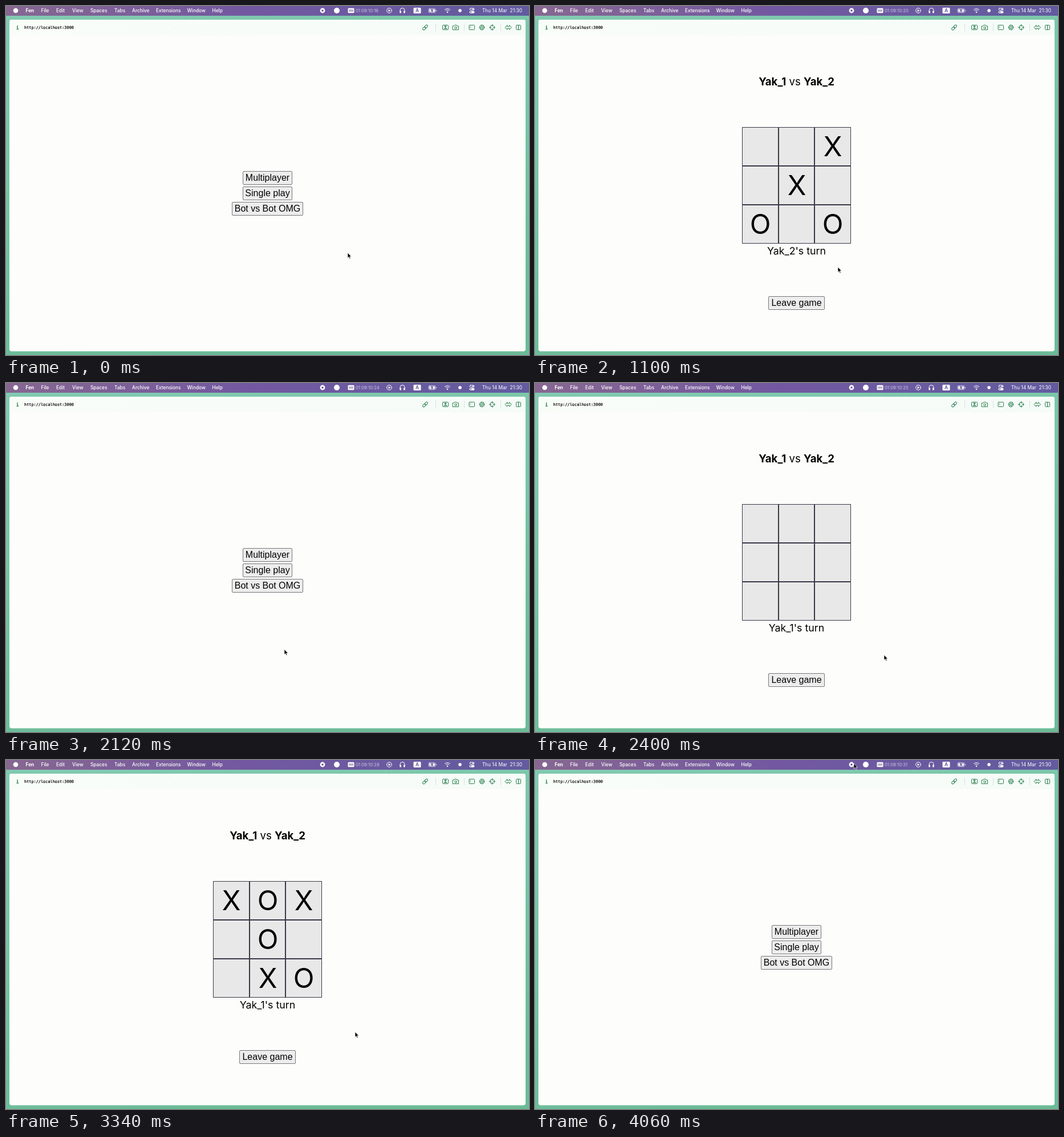
An HTML page for the animation above (4080 ms loop, 917x611 px).

```html
<!DOCTYPE html>
<html lang="en">
<head>
<meta charset="utf-8">
<title>Tic-tac-toe bots</title>
<style>
  html, body { margin: 0; width: 100%; height: 100%; overflow: hidden; background: #74c2a2; }
  svg { display: block; width: 917px; height: 611px; }
  text { font-family: Inter, sans-serif; white-space: pre; }
  .menu text { font-size: 8.3px; fill: #fff; }
  .mid { text-anchor: middle; }
  .btn text { font: 16px "Liberation Sans", Arial, sans-serif; }
  .btn rect { fill: #ededed; stroke: #77777b; }
  .mark { font-size: 48px; }
  .turn { font-size: 17.8px; }
  .url { font: 6.88px "DejaVu Sans Mono", monospace; stroke: #000; stroke-width: .2; }
  .line { fill: none; stroke: #fff; stroke-width: 1; stroke-linecap: round; stroke-linejoin: round; }
  .tools { fill: none; stroke: #2c7f4d; stroke-width: 1; stroke-linecap: round; stroke-linejoin: round; }
</style>
</head>
<body>
<svg viewBox="0 0 917 611">
  <defs>
    <linearGradient id="bar">
      <stop offset="0" stop-color="#876791"/>
      <stop offset=".45" stop-color="#7358a0"/>
      <stop offset="1" stop-color="#625b9f"/>
    </linearGradient>
    <linearGradient id="desk" x2=".3" y2="1">
      <stop offset="0" stop-color="#82cab2"/>
      <stop offset=".5" stop-color="#78c5a5"/>
      <stop offset="1" stop-color="#6bbb97"/>
    </linearGradient>
    <linearGradient id="head">
      <stop offset="0" stop-color="#f9fdf8"/>
      <stop offset="1" stop-color="#f5fbf8"/>
    </linearGradient>
  </defs>

  <rect width="917" height="611" fill="url(#desk)"/>
  <rect width="917" height="17" fill="url(#bar)"/>
  <rect x="6" y="24" width="905" height="580.5" rx="4" fill="#fdfdfb"/>
  <path d="M6 51V28a4 4 0 0 1 4-4H907a4 4 0 0 1 4 4V51Z" fill="url(#head)"/>

  <g class="menu" id="menu">
    <circle cx="17" cy="8" r="4.3" fill="#fff"/>
    <text x="905" y="11" text-anchor="end" style="font-size:8.4px">Thu 14 Mar  21:30</text>
    <circle cx="555" cy="8" r="4.4" fill="#fff"/>
    <rect x="553.4" y="6.4" width="3.2" height="3.2" rx=".5" fill="#62539a"/>
    <circle cx="580" cy="8" r="5" fill="#fff"/>
    <rect x="599.5" y="3.8" width="11" height="8.4" rx="1.5" fill="#fff"/>
    <path d="M602 6v4M604 6v4M606 6v4M608 6v4" stroke="#62539a" stroke-width=".9"/>
    <text id="clock" x="613" y="11" style="font-size:7.7px;fill:#cfc5e2"></text>
    <circle class="line" cx="672" cy="8" r="4.3"/>
    <path d="M670.6 5.8L674.4 8L670.6 10.2Z" fill="#fff"/>
    <path class="line" d="M691 10V7.6a4 4 0 0 1 8 0V10"/>
    <path d="M690.4 8.4h2.4v4.2h-1.2a1.2 1.2 0 0 1-1.2-1.2ZM699.6 8.4h-2.4v4.2h1.2a1.2 1.2 0 0 0 1.2-1.2Z" fill="#fff"/>
    <rect x="714.5" y="3" width="13" height="10" rx="1.5" fill="#fff"/>
    <text class="mid" x="721" y="11" style="fill:#55509a;font-weight:600">A</text>
    <rect class="line" x="741" y="4.8" width="12" height="6.6" rx="1.7" opacity=".75"/>
    <path d="M742.3 6h3.6l-1 2.8h2l-.6 1.4h-4ZM748.2 6h3.6v4.2h-4.3l1.8-2.7h-1.5ZM754.4 7v2.3q1-.3 1-1.15T754.4 7" fill="#fff"/>
    <path class="line" d="M769.4 6.4a6.6 6.6 0 0 1 9.2 0M771.1 8.4a4.2 4.2 0 0 1 5.8 0" stroke-width="1.3"/>
    <circle cx="774" cy="10.8" r="1.2" fill="#fff"/>
    <circle cx="796" cy="8" r="2.8" fill="#fff"/>
    <rect class="line" x="813" y="4" width="8" height="3.2" rx="1.6"/>
    <rect x="812.5" y="8.7" width="9" height="4" rx="2" fill="#fff"/>
    <circle cx="819" cy="5.6" r="1.2" fill="#fff"/>
    <circle cx="815" cy="10.7" r="1.1" fill="#62539a"/>
  </g>

  <text x="17.8" y="41" style="font:bold 8px 'DejaVu Sans Mono',monospace;fill:#1c6b3d">i</text>
  <text class="url" x="32" y="40.3">http://localhost:3000</text>

  <path d="M753.5 31v13M803.5 31v13M867.5 31v13" stroke="#d5e5dc"/>
  <g class="tools">
    <g transform="rotate(-45 735 37.5)">
      <rect x="729.5" y="35.6" width="6" height="3.8" rx="1.9"/>
      <rect x="734.5" y="35.6" width="6" height="3.8" rx="1.9"/>
    </g>
    <rect x="765.5" y="33.5" width="10" height="8" rx="1"/>
    <path d="M767.5 40q3-3 6 0M769 35.5l1.5 2 1.5-2Z" fill="#2c7f4d"/>
    <path d="M783.5 35h2.4l1-1.6h3l1 1.6h2.6v6.6h-10Z"/>
    <circle cx="788.5" cy="38.2" r="1.8"/>
    <rect x="812" y="33.5" width="9.5" height="8" rx="1"/>
    <path d="M813.8 35.7l1.3 1-1.3 1" stroke-width=".8"/>
    <circle cx="834.5" cy="37.5" r="4.3"/>
    <path id="iris" stroke-width=".9"/>
    <circle cx="852.5" cy="37.5" r="3.8"/>
    <path d="M852.5 32.5v3M852.5 39.5v3M847.5 37.5h3M854.5 37.5h3"/>
    <path d="M878.8 33.7L875 37.5L878.8 41.3V39.2H882.6V41.3L886.4 37.5L882.6 33.7V35.8H878.8Z"/>
    <rect x="894.5" y="33.5" width="8" height="8" rx="1"/>
    <path d="M898.5 33.5v8"/>
  </g>

  <g id="home" class="btn"></g>
  <g id="game">
    <text class="mid" x="458.5" y="139.4" style="font-size:18.6px"><tspan font-weight="700">Yak_1</tspan> vs <tspan font-weight="700">Yak_2</tspan></text>
    <g id="board"></g>
    <text id="turn" class="mid turn" x="458.5" y="435.3"></text>
    <g id="leave" class="btn"></g>
  </g>
  <path id="cursor" d="M0 0V9.2L2.1 7.3L3.6 10.7L5.1 10L3.7 6.8H6.5Z" fill="#000" stroke="#fff" stroke-width=".7"/>
</svg>

<script>
const LOOP = 4080, MOVE = 152;
const $ = id => document.getElementById(id);

function add(parent, tag, attrs, content = "") {
  const el = document.createElementNS("http://www.w3.org/2000/svg", tag);
  for (const key in attrs) el.setAttribute(key, attrs[key]);
  el.textContent = content;
  parent.append(el);
  return el;
}

function button(parent, label, y, width) {
  add(parent, "rect", { x: 458.5 - width / 2, y: y + .5, width, height: 23, rx: 1.5 });
  add(parent, "text", { class: "mid", x: 458.5, y: y + 17.2 }, label);
}

const menus = [["Fen", 34.5], ["File", 61.5], ["Edit", 88], ["View", 116], ["Spaces", 148],
  ["Tabs", 190], ["Archive", 221], ["Extensions", 263], ["Window", 317.5], ["Help", 361.5]];
menus.forEach(([label, x], i) =>
  add($("menu"), "text", { x, y: 11, "font-weight": i ? 500 : 700 }, label));

// Six blades of the aperture icon
let blades = "";
for (let i = 0; i < 6; i++) {
  const a = i * Math.PI / 3, b = a + 1.5;
  blades += `M${834.5 + 4.2 * Math.cos(a)} ${37.5 + 4.2 * Math.sin(a)}L${834.5 + 1.8 * Math.cos(b)} ${37.5 + 1.8 * Math.sin(b)}`;
}
$("iris").setAttribute("d", blades);

button($("home"), "Multiplayer", 289, 86);
button($("home"), "Single play", 316, 86);
button($("home"), "Bot vs Bot OMG", 343, 124);
button($("leave"), "Leave game", 508, 98);

// Cells sit on whole pixels, so neighbouring borders join into a two-pixel line
const edge = col => Math.round(363 + col * 191 / 3);
const marks = [];
for (let i = 0; i < 9; i++) {
  const col = i % 3, x = edge(col), width = edge(col + 1) - x - 1;
  const y = 212 + Math.floor(i / 3) * 68;
  add($("board"), "rect", { x: x + .5, y: y + .5, width, height: 67,
    fill: "#e8e8e8", stroke: "#3a3748" });
  marks.push(add($("board"), "text", { class: "mid mark", x: x + 32, y: y + 51.2 }));
}

const games = [
  { from: 380, to: 2040, first: 2, moves: [4, 6, 2, 8, 0, 1, 3, 5, 7] },
  { from: 2300, to: 3860, first: 1, moves: [0, 4, 2, 1, 7, 8, 6, 3, 5] }
];

// Pointer stops: time, x, y
const path = [[0, 599, 432], [60, 599, 432], [270, 490, 358], [390, 490, 358], [420, 491, 369],
  [570, 531, 457], [1820, 531, 457], [1980, 487, 519], [2060, 487, 519], [2220, 490, 357],
  [2305, 490, 357], [2395, 612, 476], [3690, 612, 476], [3810, 492, 519], [3880, 492, 519],
  [4050, 559, 6], [4080, 559, 6]];

function pointer(t) {
  const i = path.findIndex((p, n) => n && t <= p[0]);
  const [t0, x0, y0] = path[i - 1], [t1, x1, y1] = path[i];
  const k = (t - t0) / (t1 - t0), e = k * k * (3 - 2 * k);
  return [x0 + (x1 - x0) * e, y0 + (y1 - y0) * e];
}

function draw(t) {
  const game = games.find(g => t >= g.from && t < g.to);
  $("home").style.display = game ? "none" : "";
  $("game").style.display = game ? "" : "none";
  if (game) {
    const count = Math.min(9, Math.floor((t - game.from) / MOVE));
    marks.forEach((mark, cell) => {
      const n = game.moves.indexOf(cell);
      mark.textContent = n < count ? "XO"[n % 2] : "";
    });
    const player = (game.first + count) % 2 ? 1 : 2;
    $("turn").textContent = count === 9 ? "Tie" : `Yak_${player}'s turn`;
  }
  $("clock").textContent = "01:09:10:" + Math.floor(16.55 + t * .00358);
  $("cursor").setAttribute("transform", `translate(${pointer(t)})`);
}

const start = performance.now();
function tick() {
  draw((performance.now() - start) % LOOP);
  requestAnimationFrame(tick);
}
tick();
</script>
</body>
</html>
```
